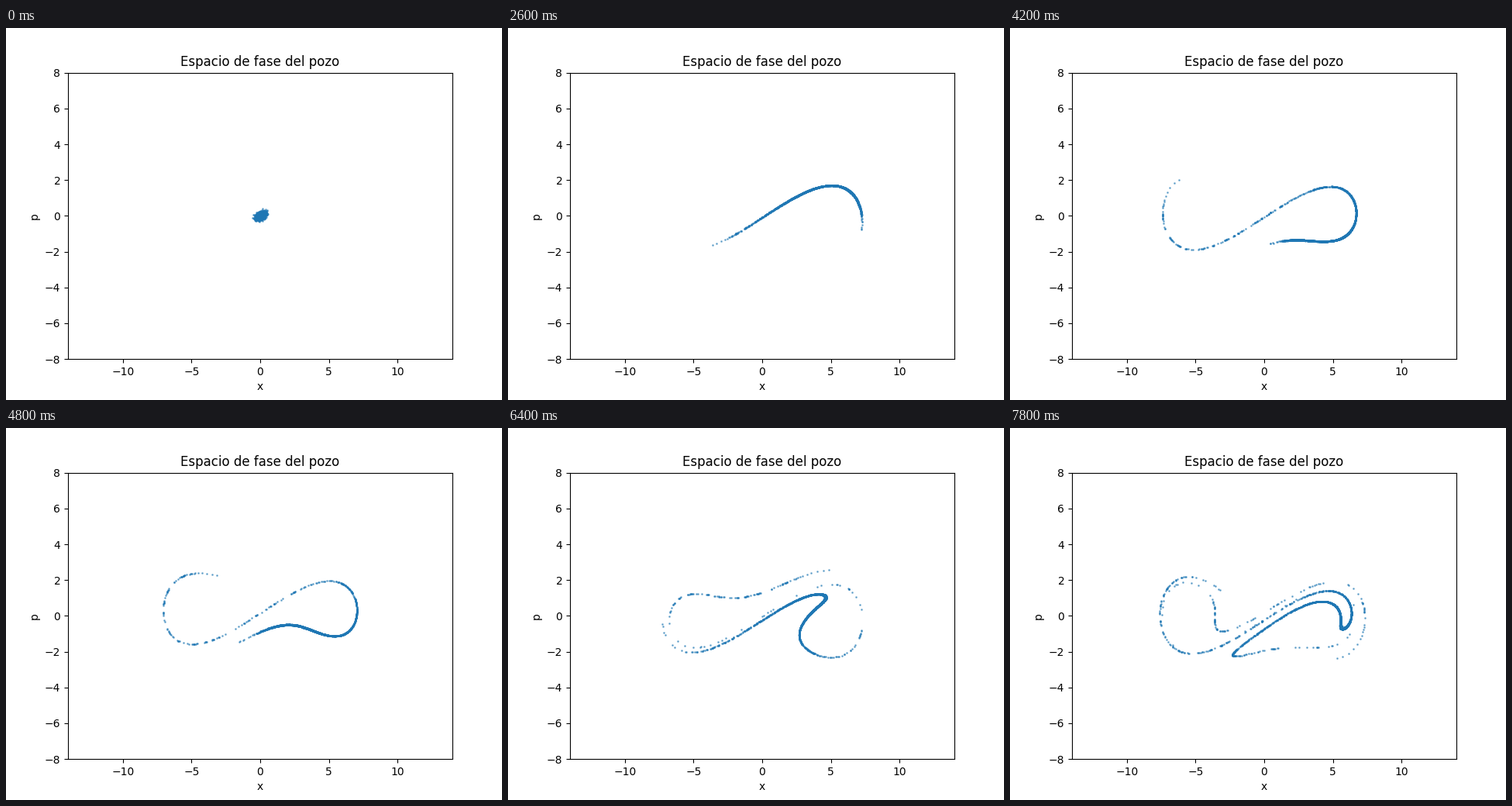
Animation, 640 px wide and 480 px high, one loop 8000 ms. Source, as a matplotlib script:

```python
import numpy as np
import matplotlib.pyplot as plt
from matplotlib.animation import FuncAnimation

FRAMES, INTERVAL = 40, 200
N = 3000
DT = 0.45            # model time per frame
SUB = 15             # integration steps per frame
WELL, STIFF = 5.0, 0.01
DRIVE, OMEGA = 0.22, np.sqrt(0.5)


def force(x, t):
    """Double well with minima at +-WELL plus a periodic push."""
    return STIFF * x * (WELL**2 - x**2) + DRIVE * np.sin(OMEGA * t)


def advance(x, p, t):
    """Leapfrog the whole ensemble over one frame."""
    h = DT / SUB
    for k in range(SUB):
        x = x + p * h / 2
        p = p + force(x, t + (k + 0.5) * h) * h
        x = x + p * h / 2
    return x, p


def trajectories():
    rng = np.random.default_rng(7)
    x = rng.normal(0.03, 0.155, N)
    p = rng.normal(0.0, 0.095, N)
    x[0], p[0] = -0.205, -0.29   # lone outlier on the left edge
    states = []
    for i in range(FRAMES):
        x, p = advance(x, p, i * DT)
        states.append((x, p))
    return states


states = trajectories()

fig, ax = plt.subplots(figsize=(6.4, 4.8), dpi=100)
ax.set_xlim(-14, 14)
ax.set_ylim(-8, 8)
ax.set_xlabel("x")
ax.set_ylabel("p")
ax.set_title("Espacio de fase del pozo")
dots, = ax.plot([], [], ".", markersize=2, alpha=0.5, color="tab:blue")


def update(i):
    dots.set_data(*states[i])
    return dots,


anim = FuncAnimation(fig, update, frames=FRAMES, interval=INTERVAL,
                     repeat=True, repeat_delay=0)
plt.show()
```
